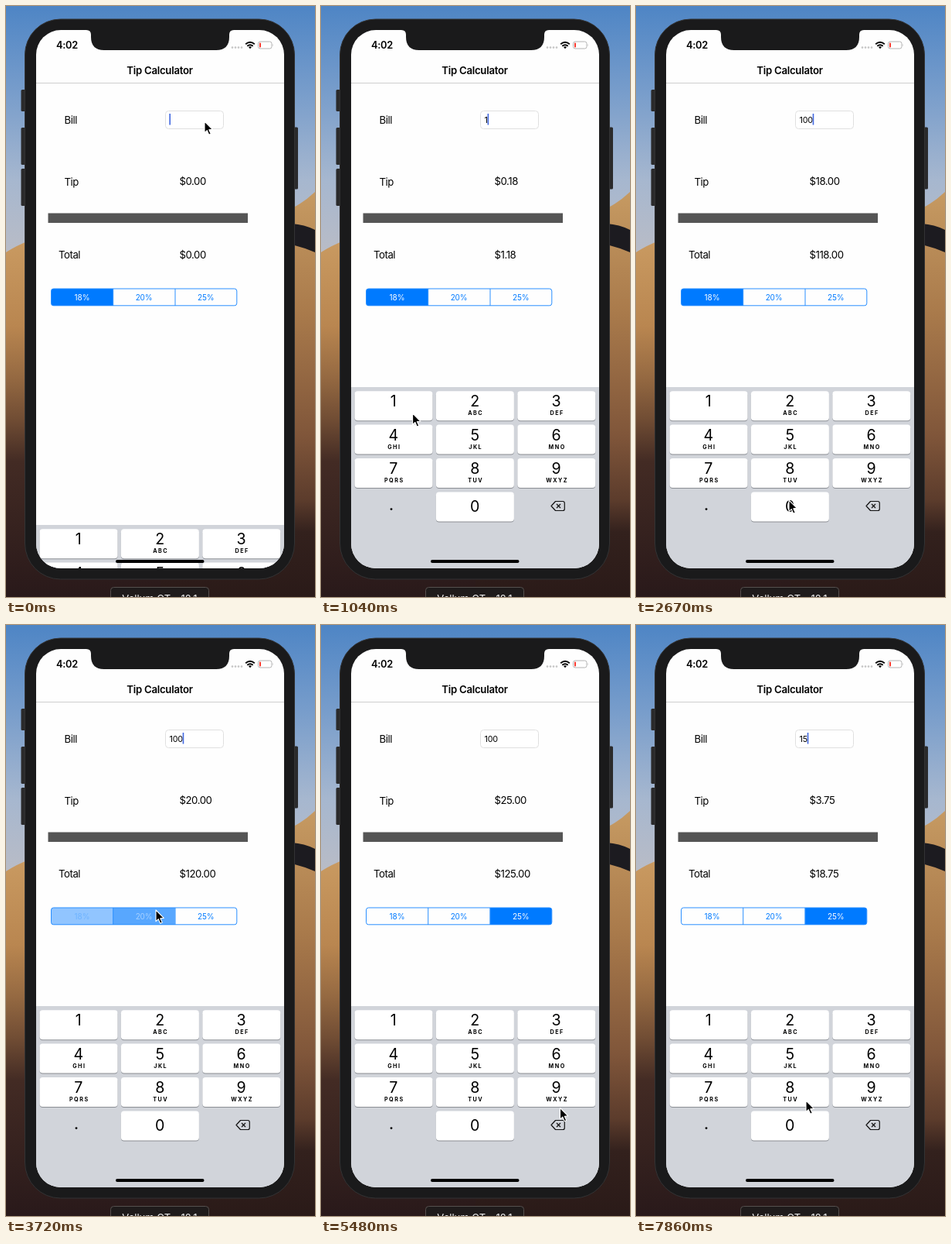
Recreate the animation shown at these times as an HTML page. Size 400 px wide and 763 px high, loop 8 s.

```html
<!DOCTYPE html>
<html lang="en">
<head>
<meta charset="utf-8">
<title>Tip Calculator</title>
<style>
  html, body { margin: 0; width: 100%; height: 100%; overflow: hidden; background: #2a1a17; }
  svg { display: block; width: 400px; height: 763px; }
  text { font-family: Inter, "Open Sans", sans-serif; white-space: pre; }
  .label { font-size: 13.2px; letter-spacing: -.45px; }
  .mid { text-anchor: middle; }
  .digit { font-size: 19.6px; }
  .letters { font-size: 7.2px; font-weight: 700; letter-spacing: 1.5px; }
</style>
</head>
<body>
<svg id="stage" viewBox="0 0 400 763" xmlns="http://www.w3.org/2000/svg">
  <defs>
    <linearGradient id="sky" x2="0" y2="1">
      <stop offset="0" stop-color="#4e85c5"/><stop offset=".35" stop-color="#789dcb"/>
      <stop offset=".7" stop-color="#a6b7cf"/><stop offset="1" stop-color="#b9bcc6"/>
    </linearGradient>
    <linearGradient id="leftDune" x2="0" y2="1">
      <stop offset="0" stop-color="#c99a61"/><stop offset=".24" stop-color="#b98650"/>
      <stop offset=".38" stop-color="#966a42"/><stop offset=".5" stop-color="#714d34"/>
      <stop offset=".62" stop-color="#432b24"/><stop offset="1" stop-color="#29191a"/>
    </linearGradient>
    <linearGradient id="rightDune" x2="0" y2="1">
      <stop offset="0" stop-color="#c69a62"/><stop offset=".3" stop-color="#a97a4b"/>
      <stop offset=".6" stop-color="#80563a"/><stop offset=".76" stop-color="#5c3c2c"/>
      <stop offset=".84" stop-color="#33211d"/><stop offset="1" stop-color="#2a1a18"/>
    </linearGradient>
    <clipPath id="screen"><rect x="39" y="31" width="321" height="695" rx="32"/></clipPath>
  </defs>

  <rect width="400" height="320" fill="url(#sky)"/>
  <path d="M0 318Q14 309 30 303H200V763H0Z" fill="url(#leftDune)"/>
  <path d="M200 300L368 262Q384 255 400 240V763H200Z" fill="url(#rightDune)"/>
  <path d="M370 281Q386 282 400 289V318Q386 312 370 308Z" fill="#1c1b20"/>

  <g fill="#2a2a2b">
    <rect x="19.5" y="108" width="7" height="28" rx="1.5"/>
    <rect x="19.5" y="157" width="7" height="48" rx="1.5"/>
    <rect x="19.5" y="210" width="7" height="48" rx="1.5"/>
    <rect x="371" y="156.500" width="7" height="80" rx="1.5"/>
  </g>
  <rect x="24.500" y="17" width="349" height="723" rx="46" fill="#1a1a1b" stroke="#333334"/>
  <rect x="135.500" y="750.500" width="127" height="30" rx="4" fill="#1f1b1b" stroke="#55504e"/>
  <text class="mid" x="199" y="769.500" font-size="13" fill="#f2f2f2">Vellum QT - 12.1</text>

  <g clip-path="url(#screen)">
    <rect x="39" y="31" width="321" height="695" fill="#fefefe"/>
    <path d="M39 99.500H360" stroke="#cfcfcf"/>
    <path d="M104 31Q110 31 110 37V40Q110 57 127 57H272Q289 57 289 40V37Q289 31 295 31Z" fill="#1a1a1b"/>
    <text x="65" y="55" font-size="12.800" font-weight="600" letter-spacing="-.3">4:02</text>
    <g id="dots" fill="#c6c6c6"></g>
    <g fill="none" stroke="#000" stroke-width="1.900">
      <path d="M310.200 49.300Q316 44.300 321.800 49.300M312.300 51.700Q316 48.700 319.700 51.700"/>
      <path d="M314 53L316 55.300L318 53Q316 51.500 314 53Z" fill="#000" stroke="none"/>
    </g>
    <rect x="326.500" y="46" width="17.500" height="9" rx="2.500" fill="none" stroke="#b3b3b3"/>
    <rect x="328" y="47.500" width="2" height="6" rx=".8" fill="#fb3b30"/>
    <path d="M345.300 49V52Q346.600 50.500 345.300 49Z" fill="#b3b3b3"/>
    <text class="mid" x="199" y="87.500" font-size="13.200" font-weight="600" letter-spacing="-.25">Tip Calculator</text>

    <text class="label" x="75.500" y="152">Bill</text>
    <text class="label" x="75.500" y="232">Tip</text>
    <text class="label" x="68" y="326">Total</text>
    <rect x="206.500" y="135.500" width="75" height="23" rx="4" fill="#fff" stroke="#e0e0e0"/>
    <text id="bill" x="211.500" y="151" font-size="10.800" letter-spacing="-.25"></text>
    <rect id="caret" y="139" width="1.600" height="14.500" fill="#4168e0"/>
    <text id="tip" class="label" x="224.500" y="231"></text>
    <text id="total" class="label" x="224.500" y="325.500"></text>
    <rect x="54.500" y="267.500" width="258.500" height="12.500" fill="#555"/>
    <g id="segments"></g>
    <g id="keyboard"></g>
    <rect x="142" y="715" width="114.500" height="4" rx="2"/>
  </g>
  <path id="cursor" d="M0 0V14.600L3.300 11.600L5.700 17.200L8.200 16.100L5.800 10.700L10.300 10.400Z"
        stroke="#fff" stroke-width="1.100" stroke-linejoin="round"/>
</svg>
<script>
const LOOP = 8000, STEP = 148.3;
const BLUE = [0, 122, 255];
const $ = id => document.getElementById(id);

function add(parent, tag, attrs, text = '') {
  const el = document.createElementNS('http://www.w3.org/2000/svg', tag);
  for (const name in attrs) el.setAttribute(name, attrs[name]);
  el.textContent = text;
  return parent.appendChild(el);
}

for (let i = 0; i < 4; i++) add($('dots'), 'circle', { cx: 293 + i * 4, cy: 53.6, r: 1.3 });

// Segmented control
const segments = ['18%', '20%', '25%'].map((label, i) => {
  const x = 58.5 + i * 80.1;
  const r = 3, w = 80.1;
  const shape = i === 0 ? `M${x + w} 365H${x + r}q-3 0-3 3V384q0 3 3 3H${x + w}Z`
    : i === 1 ? `M${x} 365h${w}v22h${-w}Z`
    : `M${x} 365H${x + w - r}q3 0 3 3V384q0 3-3 3H${x}Z`;
  return {
    fill: add($('segments'), 'path', { d: shape, fill: '#007aff' }),
    text: add($('segments'), 'text', { x: x + 40, y: 379.6, class: 'mid', 'font-size': 10, 'letter-spacing': -.1 }, label)
  };
});
add($('segments'), 'rect', { x: 58.5, y: 365, width: 240.3, height: 21.8, rx: 3, fill: 'none', stroke: '#2a8fff' });
add($('segments'), 'path', { d: 'M138.700 365v22M219 365v22', stroke: '#2a8fff' });

// Number pad
const pad = $('keyboard'), keys = {};
add(pad, 'rect', { x: 39, y: 492, width: 321, height: 234, fill: '#d1d4da' });
const letters = ['', '', 'ABC', 'DEF', 'GHI', 'JKL', 'MNO', 'PQRS', 'TUV', 'WXYZ'];
for (let n = 0; n < 10; n++) {
  const col = n ? (n - 1) % 3 : 1, row = n ? Math.floor((n - 1) / 3) : 3;
  const x = 43.5 + col * 105.4, y = 497.2 + row * 43.4, box = { x, width: 101, height: 38, rx: 4 };
  add(pad, 'rect', { ...box, y: y + 1, fill: '#8b8e94' });
  keys[n] = add(pad, 'rect', { ...box, y });
  add(pad, 'text', { x: x + 50.3, y: y + (n ? 20.2 : 25.2), class: 'mid digit' }, n);
  add(pad, 'text', { x: x + 51.3, y: y + 31.2, class: 'mid letters' }, letters[n]);
}
add(pad, 'circle', { cx: 91, cy: 649.6, r: 1.4 });
const eraser = add(pad, 'path', {
  d: 'M303.500 639.500H313Q315.300 639.500 315.300 641.800V649.200Q315.300 651.500 313 651.500H303.500L298 645.500Z',
  stroke: '#111', 'stroke-width': 1.2, 'stroke-linejoin': 'round'
});
const cross = add(pad, 'path', { d: 'M305 643l5 5m0-5l-5 5', 'stroke-width': 1.2 });

// Timelines, in steps
const bills = [[0, ''], [6, '1'], [15, '10'], [18, '100'], [38, '10'], [43, '1'], [51, '15']];
const rates = [[0, .18], [25, .2], [32, .25]];
const fills = [[0, [1, 0, 0]], [24, [1, .2, 0]], [25, [.43, .65, 0]], [26, [0, 1, 0]],
  [31, [0, 1, .2]], [32, [0, .43, .65]], [33, [0, 0, 1]]];
const pressed = { 5: 1, 14: 0, 17: 0, 50: 5 };
const erasing = [38, 39, 43];
const caretOff = [[11, 14], [20, 22], [28, 30], [35, 37]];
const rise = [178, 32, 3];
const path = [[0, 257, 149], [3, 115, 525], [8, 119, 526], [13, 198, 638], [18, 198, 638],
  [23, 190, 370], [25, 194, 368], [30, 256, 370], [32, 258, 371], [35, 315, 605],
  [37, 304, 642], [46, 304, 642], [47, 254, 590], [49, 197, 552], [51, 199, 555], [53, 220, 614]];

const latest = (list, i) => list.filter(entry => entry[0] <= i).pop()[1];
const money = v => '$' + v.toFixed(2);

function cursorAt(i) {
  const n = path.findIndex(p => p[0] >= i);
  if (n < 0) return path[path.length - 1].slice(1);
  if (n === 0) return path[0].slice(1);
  const [a, b] = [path[n - 1], path[n]];
  const u = (i - a[0]) / (b[0] - a[0]), e = u * u * (3 - 2 * u);
  return [1, 2].map(k => a[k] + (b[k] - a[k]) * e);
}

function render(t) {
  const i = Math.min(53, Math.floor((t + 4) / STEP));
  const bill = latest(bills, i), tip = bill * latest(rates, i);
  $('bill').textContent = bill;
  $('tip').textContent = money(tip);
  $('total').textContent = money(+bill + tip);

  const width = bill ? $('bill').getComputedTextLength() : 0;
  $('caret').setAttribute('x', 211.4 + width);
  $('caret').setAttribute('opacity', caretOff.some(([a, b]) => i >= a && i <= b) ? 0 : 1);

  latest(fills, i).forEach((f, k) => {
    segments[k].fill.setAttribute('opacity', f);
    segments[k].text.setAttribute('fill', `rgb(${BLUE.map(c => Math.round(c + (255 - c) * f))})`);
  });

  for (const n in keys) keys[n].setAttribute('fill', pressed[i] === +n ? '#b4b9c2' : '#fff');
  const erase = erasing.includes(i);
  eraser.setAttribute('fill', erase ? '#111' : 'none');
  cross.setAttribute('stroke', erase ? '#d1d4da' : '#111');

  pad.setAttribute('transform', `translate(0 ${rise[i] || 0})`);
  $('cursor').setAttribute('transform', `translate(${cursorAt(i)})`);
}

const start = performance.now();
function tick() {
  render((performance.now() - start) % LOOP);
  requestAnimationFrame(tick);
}
tick();
</script>
</body>
</html>
```
